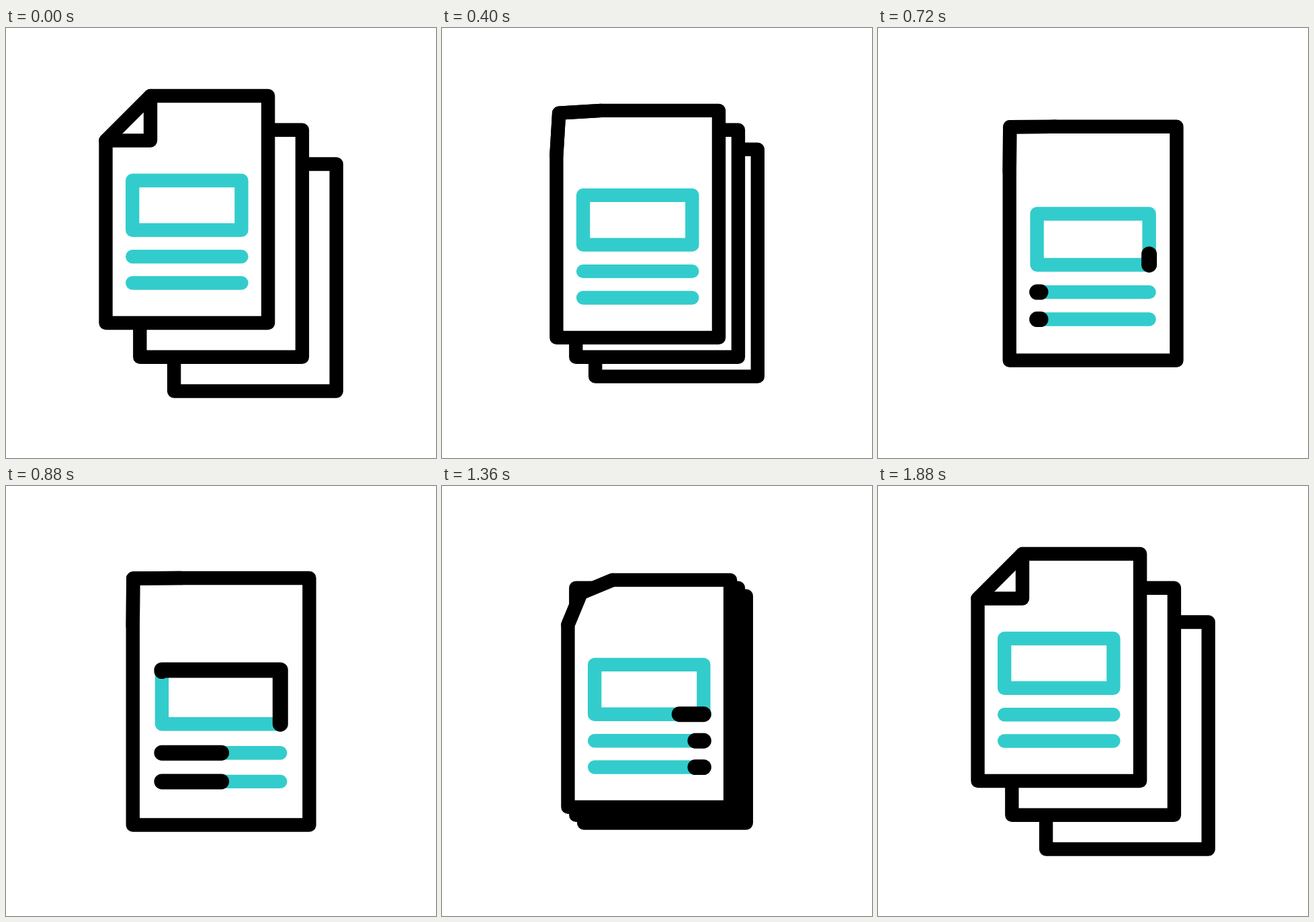
Animation of 640 by 640 pixels, one loop 3000 ms. Source, as an HTML page:

```html
<!DOCTYPE html>
<html lang="en">
<head>
<meta charset="utf-8">
<title>Stacked pages</title>
<style>
  html, body { margin: 0; width: 100%; height: 100%; overflow: hidden; background: #fff; }
  svg { display: block; width: 100%; height: 100%; }
  path { stroke-width: 20.4; stroke-linecap: round; stroke-linejoin: round; fill: none; }
  .page { fill: #fff; stroke: #000; }
  .ink { stroke: #000; }
  .teal { stroke: #33cccc; }
  .trace { stroke: #000; stroke-width: 23; }
</style>
</head>
<body>
<svg viewBox="0 0 640 640">
  <path id="back" class="page"/>
  <path id="middle" class="page"/>
  <path id="body" class="page"/>
  <path id="flap" class="ink"/>
  <g id="content"></g>
</svg>
<script>
const LOOP = 3000;
const CX = 320.1, CY = 320.75;   // centre of the stack
const W = 120.8, H = 169;        // half size of a page
const SPREAD = 50.8, FOLD = 66.5, PEAK = 0.123;

const $ = id => document.getElementById(id);
const ramp = (t, from, to) => Math.min(1, Math.max(0, (t - from) / (to - from)));
const easeOut = x => 1 - (1 - x) ** 3;

// Outlines relative to the page centre; the box runs counter-clockwise from bottom right.
const outlines = [
  [[81.1, 30.8], [81.1, -43], [-81.1, -43], [-81.1, 30.8], [81.1, 30.8]],
  [[-81.1, 70.3], [81.1, 70.3]],
  [[-81.1, 109.6], [81.1, 109.6]]
];

function addPath(className) {
  const path = document.createElementNS('http://www.w3.org/2000/svg', 'path');
  path.setAttribute('class', className);
  $('content').append(path);
  return path;
}
const bars = outlines.map(points => ({ points, teal: addPath('teal'), trace: addPath('trace') }));

const toPath = points => 'M' + points.map(p => p.map(v => v.toFixed(2)).join(' ')).join('L');

// The part of a polyline between two fractions of its length
function trim(points, start, end) {
  const lengths = points.slice(1).map((p, i) => Math.hypot(p[0] - points[i][0], p[1] - points[i][1]));
  const total = lengths.reduce((a, b) => a + b);
  const from = start * total, to = end * total;
  const result = [];
  let at = 0;
  lengths.forEach((length, i) => {
    const a = Math.max(from, at), b = Math.min(to, at + length);
    if (b > a) {
      const point = d => points[i].map((v, k) => v + (points[i + 1][k] - v) * (d - at) / length);
      if (!result.length) result.push(point(a));
      result.push(point(b));
    }
    at += length;
  });
  return result;
}

function draw(t) {
  const spread = SPREAD * (t < 1000 ? 1 - ramp(t, 220, 640) : easeOut(ramp(t, 1320, 1804)));
  const scale = 1 + PEAK * (ramp(t, 640, 980) - ramp(t, 980, 1320));
  const open = 0.993 * (t < 1000 ? easeOut(ramp(t, 200, 518)) : 1 - easeOut(ramp(t, 1320, 1702)));
  const end = ramp(t, 710, 1050), start = ramp(t, 1047, 1387);

  const place = (points, shift, size = 1) =>
    points.map(([x, y]) => [CX + shift + x * size, CY + shift + y * size]);
  const sheet = [[-W, -H], [W, -H], [W, H], [-W, H]];
  $('back').setAttribute('d', toPath(place(sheet, spread)) + 'Z');
  $('middle').setAttribute('d', toPath(place(sheet, 0)) + 'Z');

  const front = points => place(points, -spread, scale);
  const left = [-W, -H + FOLD], top = [-W + FOLD, -H];
  const inset = FOLD * (1 - open);
  const corner = [-W + inset, -H + inset];
  // Once the flap crosses the crease it becomes the page corner.
  const edge = open > 0.5 ? [left, corner, top] : [left, top];
  $('body').setAttribute('d', toPath(front([...edge, [W, -H], [W, H], [-W, H]])) + 'Z');
  $('flap').setAttribute('d', toPath(front([left, corner, top])));

  for (const { points, teal, trace } of bars) {
    const placed = front(points);
    const traced = trim(placed, start, end);
    teal.setAttribute('d', toPath(placed));
    trace.setAttribute('d', traced.length ? toPath(traced) : '');
  }
}

const began = performance.now();
function tick() {
  draw((performance.now() - began) % LOOP);
  requestAnimationFrame(tick);
}
tick();
</script>
</body>
</html>
```
